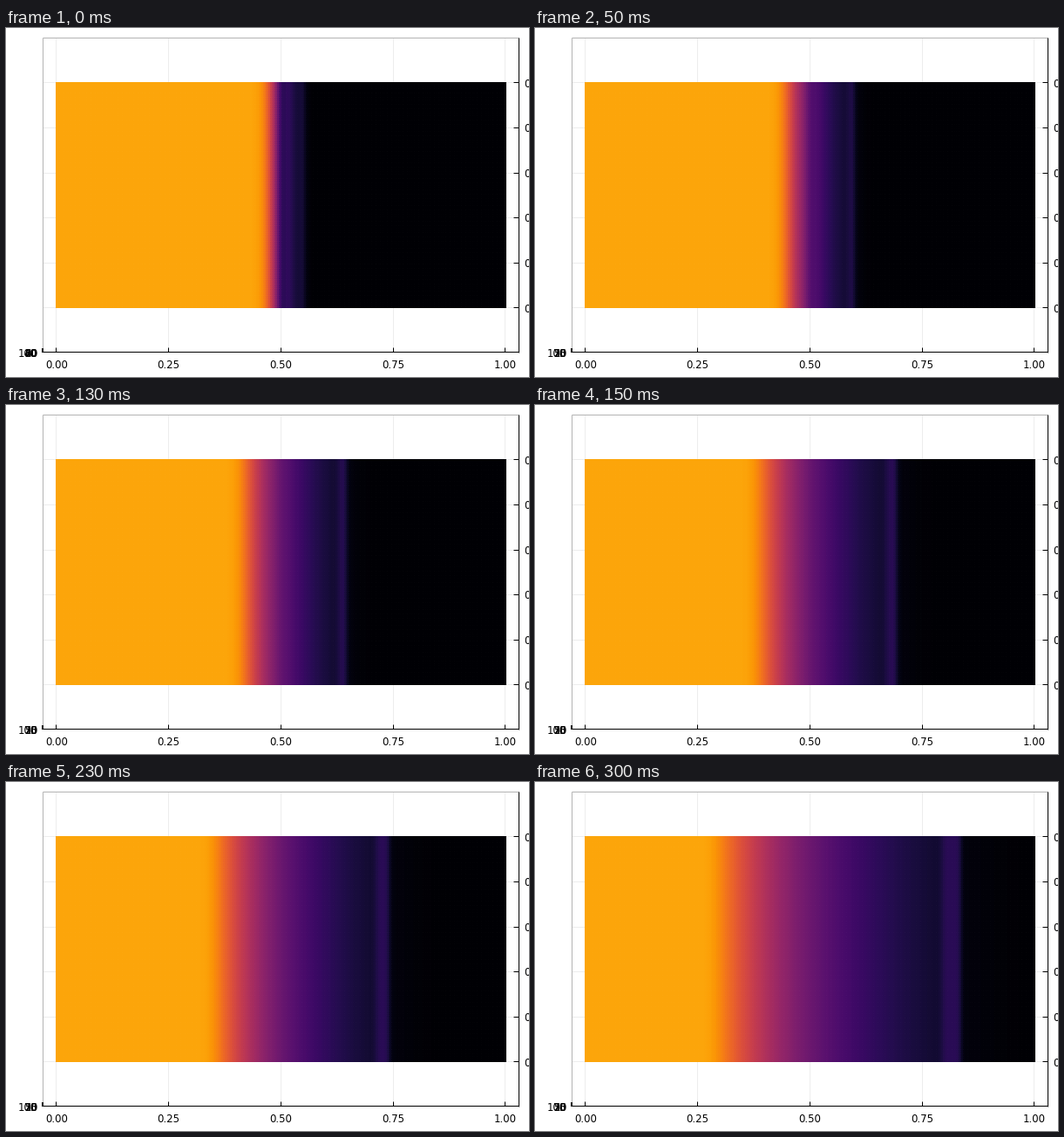
Recreate the animation shown at these times as a matplotlib script. Size 600 by 400 pixels, loop 0.35 s.

```python
import numpy as np
import matplotlib.pyplot as plt
from matplotlib.animation import FuncAnimation
from matplotlib.patches import Rectangle

W, H, DPI = 600, 400, 100
FRAMES, STEP_MS = 7, 50
PX = 72 / DPI
LEFT, RIGHT, TOP, BOTTOM = 42, 588, 11, 371
X0, X1, Y0, Y1 = 57.3, 572.3, 62.4, 320.2
NX, NY = 201, 101


def step(x, at, width):
    return 1 / (1 + np.exp(-(x - at) / width))


def level(x, n):
    """Shock tube profile: rarefaction fan, shell, shock, fading precursor."""
    t = n + 1
    head = .5 - .031 * t
    contact = .505 + .0415 * t
    shock = .505 + .0475 * t
    decay, soft = .032 * t, .008

    fan = .8 * np.exp(-soft / decay * np.logaddexp(0, (x - head) / soft))
    # Start-up dip beside the removed wall, soon gone.
    fan -= .11 * np.exp(-n - ((x - .503) / .011) ** 2)
    tail = .022 * np.clip(1 - (x - shock) / (.023 * t), 0, 1)

    value = fan + (.148 - fan) * step(x, contact, .004)
    return value + (tail - value) * step(x, shock, .003)


fig = plt.figure(figsize=(W / DPI, H / DPI), dpi=DPI, facecolor="white")
ax = fig.add_axes([0, 0, 1, 1])
ax.set(xlim=(0, W), ylim=(H, 0))
ax.axis("off")


def line(xs, ys, color="black", width=1.0, z=3):
    ax.plot(xs, ys, color=color, lw=width * PX, zorder=z,
            solid_capstyle="butt")


def label(x, y, s, ha="center"):
    return ax.text(x, y, s, ha=ha, va="center_baseline", color="black",
                   family="DejaVu Sans", size=11.7 * PX, zorder=4)


for i, x in enumerate(np.linspace(X0, X1, 5)):
    line([x, x], [TOP, BOTTOM], "#ededed", z=0)
    line([x, x], [BOTTOM - 5, BOTTOM])
    label(x + .4, 385.3, f"{i / 4:.2f}")

for i, y in enumerate(np.linspace(Y0, Y1, 6)):
    line([LEFT, RIGHT], [y, y], "#ededed", z=0)
    line([RIGHT - 6, RIGHT], [y, y])
    label(594.3, y + .4, f"{(5 - i) / 10:.1f}", "left")

line([LEFT, RIGHT], [TOP, TOP], "#b4b4b4", z=1)
line([LEFT, LEFT], [TOP, BOTTOM], "#b4b4b4", z=1)
line([RIGHT, RIGHT], [TOP, BOTTOM + 1])
line([LEFT, RIGHT], [BOTTOM, BOTTOM])
line([LEFT, LEFT], [BOTTOM - 4, BOTTOM + 1], width=2)

# The vertical axis is seen end-on, so all its labels pile up.
heights = [[label(35.6, 372, str(v), "right") for v in range(0, 101, gap)]
           for gap in (20, 25)]

cells = np.linspace(0, 1, NX)
gx, gy = np.meshgrid(X0 + .3 + (X1 - X0) * cells,
                     np.linspace(Y0 + .5, Y1 + .5, NY))
dots = ax.scatter(gx.ravel(), gy.ravel(), s=(3.9 * PX) ** 2, linewidths=0,
                  c=np.zeros(gx.size), cmap="inferno", vmin=0, vmax=1,
                  zorder=2)
dots.set_clip_path(Rectangle((57, 62), 517, 259, transform=ax.transData))


def update(n):
    dots.set_array(np.tile(level(cells, n), NY))
    for k, group in enumerate(heights):
        for t in group:
            t.set_visible(k == min(n, 1))
    return [dots]


anim = FuncAnimation(fig, update, frames=FRAMES, interval=STEP_MS,
                     repeat=True, repeat_delay=0, blit=False)
plt.show()
```
